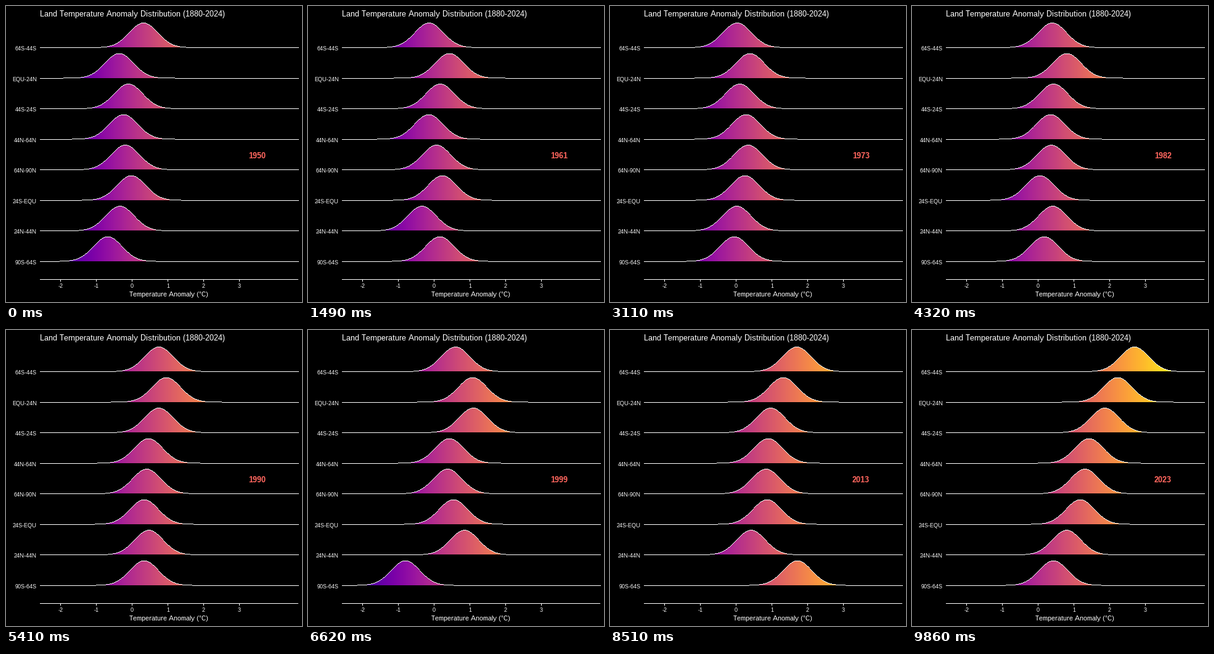
Animation of 480x480 px, one loop 10 s. Source, as a matplotlib script:

```python
import matplotlib.pyplot as plt
import numpy as np
from matplotlib.animation import FuncAnimation

SIZE, DPI = 480, 96
LOOP_MS = 10000
FIRST, LAST = 1950, 2023
YEARS = np.arange(FIRST, LAST + 1)
STEPS = 3                           # drawn frames per year

LEFT, RIGHT, AXIS_Y = 55, 475, 443
ZERO_X, UNIT = 204, 57.9            # pixel of 0 °C, pixels per °C
TOP_BASE, ROW_STEP = 67, 49.52
PEAK, SIGMA = 40, 0.4
COLOR_MIN, COLOR_MAX = -2.75, 3.95

# Whole-pixel glyphs without kerning
plt.rcParams.update({
    "font.family": "Liberation Sans",
    "text.hinting": "native",
    "text.hinting_factor": 1,
    "text.kerning_factor": 6,
})

LABELS = ["64S-44S", "EQU-24N", "44S-24S", "44N-64N",
          "64N-90N", "24S-EQU", "24N-44N", "90S-64S"]

# Anomaly of each zone in a few key years
KEYS = {
    1950: [.32, -.36, -.10, -.24, -.19, -.02, -.34, -.68],
    1961: [-.14, .43, .17, -.15, .07, .23, -.34, .16],
    1973: [.03, .39, .10, .28, .34, .25, .02, -.05],
    1990: [.75, .96, .75, .46, .41, .34, .47, .34],
    1999: [.60, 1.08, 1.10, .43, .38, .54, .85, -.80],
    2013: [1.70, 1.32, .97, .90, .84, .87, .42, 1.72],
    2023: [2.70, 2.23, 1.87, 1.43, 1.31, 1.18, .80, .43],
}


def yearly_means():
    """Trend through the key years plus weather noise, larger at the poles."""
    key_years = np.array(list(KEYS))
    trend = np.array([np.interp(YEARS, key_years, zone)
                      for zone in zip(*KEYS.values())])
    spread = 0.04 + 0.08 * np.abs(np.arange(len(LABELS)) - 3.5)
    noise = np.random.default_rng(5).normal(size=trend.shape)
    noise[:, key_years - FIRST] = 0
    return trend + spread[:, None] * np.clip(noise, -2, 2)


MEANS = yearly_means()
DEGREES = (np.arange(LEFT, RIGHT) - ZERO_X) / UNIT
GRADIENT = plt.get_cmap("plasma")(
    np.clip((DEGREES - COLOR_MIN) / (COLOR_MAX - COLOR_MIN), 0, 1))[:, :3]
SCAN = np.arange(SIZE)[:, None]


def whole(y):
    return np.floor(y + 0.5).astype(int)


fig = plt.figure(figsize=(SIZE / DPI, SIZE / DPI), dpi=DPI, facecolor="black")
ax = fig.add_axes([0, 0, 1, 1])
ax.set_axis_off()


def text(x, y, label, px, **style):
    style = {"color": "white", "ha": "center", "va": "baseline", **style}
    return ax.text(x, y, label, fontsize=px * 72 / DPI, **style)


def stroke(xs, ys):
    ax.plot(np.array(xs) + 0.5, np.array(ys) + 0.5, color="white",
            lw=72 / DPI, antialiased=False, snap=False,
            solid_capstyle="projecting")


ridges = ax.imshow(np.zeros((SIZE, SIZE, 3)), extent=(0, SIZE, SIZE, 0),
                   interpolation="nearest", aspect="auto")
for row, label in enumerate(LABELS):
    text(50, whole(TOP_BASE + row * ROW_STEP) + 5, label, 9, ha="right")

stroke([LEFT, RIGHT - 2], [AXIS_Y, AXIS_Y])
for tick in range(-2, 4):
    x = whole(ZERO_X + tick * UNIT)
    stroke([x, x], [AXIS_Y, AXIS_Y + 3])
    text(x + 0.5, 457, str(tick), 9)

text(55, 17, "Land Temperature Anomaly Distribution (1880-2024)", 13, ha="left")
text(264, 471, "Temperature Anomaly (°C)", 11)
year_text = text(407, 247, "", 13, color="#ff665e", weight="bold")

ax.set_xlim(0, SIZE)
ax.set_ylim(SIZE, 0)


def draw(frame):
    # Years change a little early, so rounded times never show the old one
    year = min((frame + 1) // STEPS, len(YEARS) - 1)
    image = np.zeros((SIZE, SIZE, 3))
    panel = image[:, LEFT:RIGHT]
    colors = np.broadcast_to(GRADIENT, panel.shape)
    for row, mean in enumerate(MEANS[:, year]):
        base = TOP_BASE + row * ROW_STEP
        z = (DEGREES - mean) / SIGMA
        curve = whole(base - PEAK * np.exp(-z * z / 2))
        inside = (SCAN > curve) & (SCAN < whole(base))
        panel[inside] = colors[inside]
        panel[SCAN == curve] = 1
    ridges.set_data(image)
    year_text.set_text(str(YEARS[year]))
    return [ridges, year_text]


FRAMES = STEPS * len(YEARS)
anim = FuncAnimation(fig, draw, frames=FRAMES, interval=LOOP_MS / FRAMES,
                     repeat=True, repeat_delay=0)
plt.show()
```
